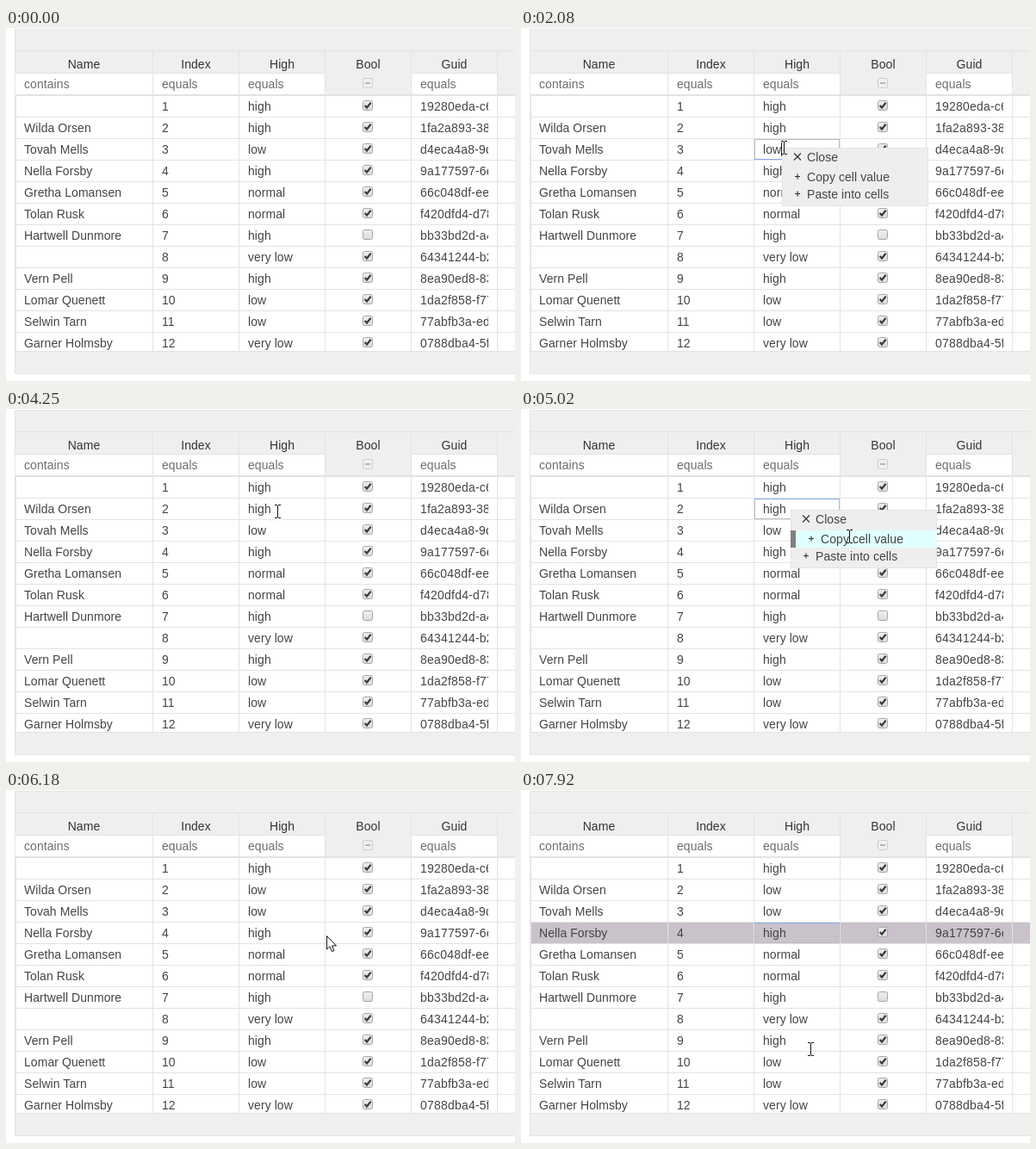
Recreate the animation shown at these times as an HTML page. Size 591 px wide and 410 px high, loop 8 s.

```html
<!DOCTYPE html>
<html lang="en">
<head>
<meta charset="utf-8">
<title>Grid with cell menu</title>
<style>
html, body { margin: 0; width: 100%; height: 100%; overflow: hidden; background: #fff; }
svg { display: block; font: 14px "Liberation Sans", Arial, Helvetica, sans-serif; letter-spacing: .07px; cursor: default; }
text { fill: #444; white-space: pre; }
.title { fill: #333; text-anchor: middle; }
.filter { fill: #6c6c6c; }
.guid { letter-spacing: .21px; }
rect, .crisp { shape-rendering: crispEdges; }
.smooth { shape-rendering: auto; }
</style>
</head>
<body>
<svg id="stage" width="591" height="410" viewBox="0 0 591 410">
  <defs>
    <linearGradient id="boxFill" x1="0" y1="0" x2="0" y2="1">
      <stop offset="0" stop-color="#efefef"/><stop offset="1" stop-color="#dcdcdc"/>
    </linearGradient>
    <clipPath id="guidClip"><rect x="471" y="53" width="89" height="322"/></clipPath>
  </defs>
</svg>
<script>
const LOOP = 8000, FIRST = 130, TICK = 77.1, BLINK = 500;
const ROW_TOP = 79, ROW_H = 25, COL = 100, PAD = 11;
const LINE = "#e3e3e3", PANEL = "#efefef";
const stage = document.getElementById("stage");

function add(parent, tag, attrs, content) {
  const el = document.createElementNS("http://www.w3.org/2000/svg", tag);
  for (const key in attrs) el.setAttribute(key, attrs[key]);
  if (content !== undefined) el.textContent = content;
  parent.appendChild(el);
  return el;
}
const box = (parent, x, y, width, height, fill) => add(parent, "rect", { x, y, width, height, fill });
const label = (parent, x, y, content, attrs = {}) => add(parent, "text", { x, y, ...attrs }, content);
const show = (el, on) => el.setAttribute("visibility", on ? "visible" : "hidden");
const place = (el, x, y) => el.setAttribute("transform", `translate(${x} ${y})`);
const rowTop = row => ROW_TOP + ROW_H * row;
const colLeft = col => col ? 70 + COL * col : 10;   // line left of a column

const titles = ["Name", "Index", "High", "Bool", "Guid"];
const filters = ["contains", "equals", "equals", "", "equals"];
const names = ["", "Wilda Orsen", "Tovah Mells", "Nella Forsby", "Gretha Lomansen", "Tolan Rusk",
  "Hartwell Dunmore", "", "Vern Pell", "Lomar Quenett", "Selwin Tarn", "Garner Holmsby"];
const values = ["high", "high", "low", "high", "normal", "normal",
  "high", "very low", "high", "low", "low", "very low"];
const guids = ["19280eda-c6", "1fa2a893-38", "d4eca4a8-9d", "9a177597-6e", "66c048df-ee", "f420dfd4-d78",
  "bb33bd2d-a4", "64341244-b2", "8ea90ed8-83", "1da2f858-f77", "77abfb3a-ed", "0788dba4-5f"];

function checkbox(y, state) {
  const g = add(stage, "g", { transform: `translate(414 ${y})` });
  const mixed = state === "mixed";
  add(g, "rect", { x: .5, y: .5, width: 11, height: 11, rx: 2, class: "smooth",
    fill: mixed ? "#f0f0f0" : "url(#boxFill)", stroke: mixed ? "#ccc" : "#a6a6a6" });
  if (mixed) box(g, 3, 5, 6, 2, "#b5b5b5");
  if (state === "on") add(g, "path", { d: "M2.6 6 L5 8.5 L9.6 2.8", fill: "none", stroke: "#3c3c3c", "stroke-width": 2.2 });
}

// Panel, body and selected row
box(stage, 10, 1, 581, 401, "#e6e6e6");
box(stage, 11, 2, 580, 399, PANEL);
box(stage, 11, ROW_TOP, 580, 296, "#fff");
box(stage, 10, 26, 581, 1, LINE);
const selection = box(stage, 12, rowTop(3), 579, 24, "#c9c2ca");

// Columns with header and filter
titles.forEach((title, col) => {
  const left = colLeft(col), right = colLeft(col + 1);
  label(stage, (left + right + 1) / 2, 47, title, { class: "title" });
  if (filters[col]) {
    box(stage, left + 1, 52, right - left - 1, 1, LINE);
    box(stage, left + 1, 53, right - left - 1, 24, "#fff");
    label(stage, left + PAD, 70, filters[col], { class: "filter" });
  }
  box(stage, right, 27, 1, 348, LINE);
});
checkbox(58, "mixed");
box(stage, 11, 77, 580, 2, LINE);
box(stage, 11, ROW_TOP, 1, 296, LINE);

const levels = values.map((value, row) => {
  const y = rowTop(row) + 17;
  box(stage, 11, rowTop(row) - 1, 580, 1, LINE);
  label(stage, colLeft(0) + PAD, y, names[row]);
  label(stage, colLeft(1) + PAD, y, row + 1);
  label(stage, colLeft(4) + PAD, y, guids[row], { class: "guid", "clip-path": "url(#guidClip)" });
  checkbox(rowTop(row) + 5, row === 6 ? "off" : "on");
  return label(stage, colLeft(2) + PAD, y, value);
});
box(stage, 10, 375, 581, 1, LINE);
box(stage, 11, 376, 580, 25, PANEL);

// Focused cell with its caret
const focusBox = add(stage, "g", {});
add(focusBox, "rect", { x: .5, y: .5, width: 98, height: 23, fill: "none", stroke: "#b9bcc4" });
const focusEdge = box(focusBox, 0, 0, 99, 1, "#86a9ea");
const caret = box(focusBox, 0, 4, 1, 16, "#222");

// Context menu
const menu = add(stage, "g", {});
box(menu, 0, 0, 170, 68, "#e4e4e4");
box(menu, 1, 1, 168, 66, "#eee");
const CROSS = "M-4 -4 l8 8 M4 -4 l-8 8", PLUS = "M-3 0 h6 M0 -3 v6";
const items = [["Close", 1, CROSS], ["Copy cell value", 24, PLUS], ["Paste into cells", 44, PLUS]]
  .map(([title, top, icon]) => {
    const back = add(menu, "g", {});
    box(back, 0, top, 170, 20, "#e0ffff");
    box(back, 0, top, 6, 20, "#808080");
    const face = add(menu, "g", {});
    label(face, 29, top + 15, title);
    add(face, "path", { d: icon, transform: `translate(18 ${top + 9.5})`, stroke: "#333", "stroke-width": 1.15 });
    return { back, face, top };
  });

// Pointers
const beam = add(stage, "path", { class: "crisp", fill: "none", stroke: "#111",
  d: "M-3 -7.5 H0 M1 -7.5 H4 M.5 -7 V7 M-3 7.5 H0 M1 7.5 H4" });
const arrow = add(stage, "path", { fill: "#fff", stroke: "#111", "stroke-linejoin": "round",
  d: "M.5 .5 V16 L4 12.8 L6.5 18.6 L9 17.6 L6.6 11.9 H11.5 Z" });

// Pointer moves; it rests in between
const entry = { x: 468, y: 349 };
const moves = [
  { from: 120, to: 520, x: 314, y: 124 },
  { from: 520, to: 640, x: 323, y: 139 },
  { from: 1130, to: 1640, x: 305, y: 139 },
  { from: 2270, to: 2740, x: 363, y: 168 },
  { from: 2890, to: 3040, x: 366, y: 169 },
  { from: 3380, to: 3650, x: 316, y: 138 },
  { from: 4130, to: 4220, x: 315, y: 119 },
  { from: 4830, to: 4985, x: 381, y: 148 },
  { from: 4985, to: 5215, x: 378, y: 171 },
  { from: 5360, to: 5530, x: 372, y: 169 },
  { from: 6220, to: 6750, x: 333, y: 134 },
  { from: 6830, to: 7150, x: 331, y: 168 },
  { from: 7590, to: 7740, x: 345, y: 235 },
  { from: 7740, to: 7890, x: 336, y: 301 }
];

// Cell visits: focus, menu opening, choice, and where the menu opens
const visits = [
  { row: 2, focus: 2000, open: 2080, pick: 3320, x: 303, y: 139, edge: 23 },
  { row: 1, focus: 4470, open: 4620, pick: 5800, x: 313, y: 117, edge: 0 },
  { row: 3, focus: 7230, open: LOOP, pick: LOOP, edge: 0 }
];
const PASTED = visits[1].pick, SELECTED = 7470, CLOSING = 80;

const easeOut = k => k * (1.6 - .6 * k);

function pointerAt(t) {
  const q = FIRST + Math.floor((t - FIRST) / TICK) * TICK;
  let { x, y } = entry;
  for (const move of moves) {
    if (q < move.from) break;
    const k = easeOut(Math.min(1, (q - move.from) / (move.to - move.from)));
    x += (move.x - x) * k;
    y += (move.y - y) * k;
  }
  return [Math.round(x), Math.round(y)];
}

function draw(t) {
  const [x, y] = pointerAt(t);
  const focus = visits.find(v => t >= v.focus && t < v.pick);
  const opened = visits.find(v => t >= v.open && t < v.pick + CLOSING);

  show(selection, t >= SELECTED);
  levels[1].textContent = t >= PASTED ? "low" : "high";

  show(focusBox, focus);
  show(caret, focus && Math.floor((t - focus.focus) / BLINK) % 2 === 0);
  if (focus) {
    place(focusBox, colLeft(2) + 1, rowTop(focus.row));
    caret.setAttribute("x", Math.round(10 + levels[focus.row].getComputedTextLength()));
    focusEdge.setAttribute("y", focus.edge);
  }

  show(menu, opened);
  if (opened) place(menu, opened.x, opened.y);
  for (const { back, face, top } of items) {
    const dy = opened ? y - opened.y - top : -1;
    const hover = dy > 1 && dy < 20;
    show(back, hover);
    place(face, hover ? 6 : 0, 0);
  }

  const seen = t >= FIRST, plain = !opened && x > colLeft(3) && x <= colLeft(4);
  show(arrow, seen && plain);
  show(beam, seen && !plain);
  place(plain ? arrow : beam, x, y);
}

const begin = performance.now();
function frame() {
  draw((performance.now() - begin) % LOOP);
  requestAnimationFrame(frame);
}
draw(0);
requestAnimationFrame(frame);
</script>
</body>
</html>
```
